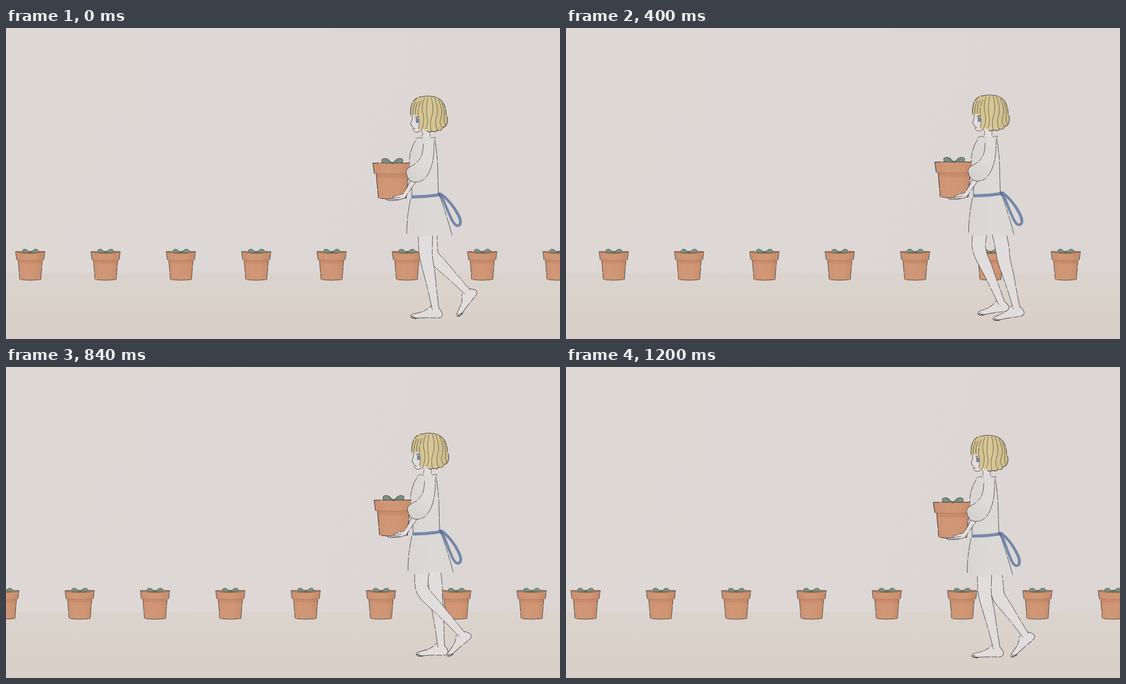
Recreate the animation shown at these times as an HTML page with a canvas. Size 998 by 561 pixels, loop 1.24 s.

```html
<!DOCTYPE html>
<html lang="en">
<head>
<meta charset="utf-8">
<title>Walk with a plant pot</title>
<style>
html, body { margin: 0; width: 100%; height: 100%; overflow: hidden; background: #ddd8d5; }
canvas { display: block; width: 100%; height: 100%; }
</style>
</head>
<body>
<canvas id="stage" width="998" height="561"></canvas>
<script>
const ctx = document.getElementById('stage').getContext('2d');
const STEP = 40, FRAMES = 31, CYCLE = 1280;
const INK = 'rgba(38,37,40,.8)', SKIN = '#e1dddc', CLOTH = '#dcd9d7', BLUE = '#7388ab';
const PENCIL = [24, 1.5, 11, 2.5, 33, 1];

// One leg over a full cycle: time, knee x/y, ankle x/y, toe x/y
const GAIT = [
  [0, 756, 409, 774, 508, 730, 520],
  [40, 758, 409, 774, 508, 730, 521],
  [160, 774, 411, 786, 508, 739, 521],
  [200, 777, 411, 789, 508, 745, 521],
  [320, 783, 412, 803, 508, 760, 522],
  [400, 787, 412, 812, 506, 770, 525],
  [560, 779, 411, 833, 487, 811, 520],
  [640, 768, 409, 837, 480, 820, 519],
  [680, 762, 408, 837, 478, 824, 518],
  [800, 751, 404, 828, 475, 813, 515],
  [840, 748, 403, 822, 483, 799, 516],
  [960, 746, 402, 796, 495, 753, 519],
  [1040, 746, 401, 790, 500, 748, 518],
  [1200, 754, 409, 776, 508, 734, 520]
];

function key(i) {
  const n = GAIT.length, lap = Math.floor(i / n);
  const [t, ...pose] = GAIT[i - lap * n];
  return { t: t + lap * CYCLE, pose };
}

// Cyclic Hermite interpolation through the keys
function poseAt(time) {
  const t = time % CYCLE;
  let i = 0;
  while (key(i + 1).t <= t) i++;
  const [a, b, c, d] = [-1, 0, 1, 2].map(o => key(i + o));
  const h = c.t - b.t, s = (t - b.t) / h;
  return b.pose.map((p, j) => {
    const q = c.pose[j];
    const m = (q - a.pose[j]) / (c.t - a.t) * h;
    const n = (d.pose[j] - p) / (d.t - b.t) * h;
    return p + s * m + s * s * (3 * (q - p) - 2 * m - n) + s * s * s * (2 * (p - q) + m + n);
  });
}

function paint(d, fill, stroke, width = .95) {
  const path = new Path2D(d);
  if (fill) { ctx.fillStyle = fill; ctx.fill(path); }
  if (stroke) {
    ctx.setLineDash(stroke === INK ? PENCIL : []);
    ctx.strokeStyle = stroke;
    ctx.lineWidth = width;
    ctx.stroke(path);
  }
}

function gradient(x0, y0, x1, y1, ...colors) {
  const g = ctx.createLinearGradient(x0, y0, x1, y1);
  colors.forEach((c, i) => g.addColorStop(i / (colors.length - 1), c));
  return g;
}

function at(x, y, draw) {
  ctx.save();
  ctx.translate(x, y);
  draw();
  ctx.restore();
}

function backdrop() {
  ctx.fillStyle = gradient(0, 0, 998, 442, '#ded9d5', '#ddd8d5', '#dbd6d3');
  ctx.fillRect(0, 0, 998, 442);
  ctx.fillStyle = gradient(0, 441, 0, 561, '#dbd4ce', '#d9d1ca', '#d8cfc8');
  ctx.fillRect(0, 441.5, 998, 120);
}

function pot(x, y, sx, sy, open) {
  at(x, y, () => {
    ctx.scale(sx, sy);
    const clay = gradient(-25, 0, 25, 0, '#c99170', '#d09878', '#cf9674', '#c38b6b');
    paint('M-22 14L-19 50.5Q0 53 19 50.5L22 14Z', clay, INK);
    paint('M-21.5 15H21.5L21 20Q0 24 -21 20Z', 'rgba(150,85,55,.15)');
    paint('M-26.5 0Q0 -1 26.5 0L24.5 15Q0 17 -24.5 15Z', clay);
    paint('M-24.5 15L-26.5 0Q0 -1 26.5 0L24.5 15', null, INK);
    paint('M-24.5 15Q0 17 24.5 15', null, 'rgba(110,65,45,.35)', .7);
    if (open) paint('M-25 .5H25Q20 3.5 0 3.8Q-20 3.5 -25 .5Z', '#b58468', 'rgba(70,45,35,.5)', .6);
    ctx.translate(0, open ? 2.4 : 0);
    paint('M0 1C-3 -1 -4 -6 -9 -6.8C-16 -7 -15.5 -1.5 -11 -.4Q-5 .8 0 -1Q5 .8 11 -.4C15.5 -1.5 16 -7 9 -6.8C4 -6 3 -1 0 1Z',
      '#7f9584', '#424e46', .8);
    paint('M0 -1L-10 -4M0 -1L10 -4M0 -1V2', null, '#5c7163', .6);
  });
}

function leg(time, dx, dy) {
  let [kx, ky, ax, ay, tx, ty] = poseAt(time);
  kx += dx * .5; ax += dx; tx += dx; ay += dy; ty += dy;
  const hx = 755 + .75 * (kx - 755);
  const shin = Math.hypot(ax - kx, ay - ky);
  const nx = (ay - ky) / shin, ny = -(ax - kx) / shin;
  const side = (part, w) => [kx + (ax - kx) * part + nx * w, ky + (ay - ky) * part + ny * w];

  const len = Math.hypot(tx - ax, ty - ay);
  const ux = (tx - ax) / len, uy = (ty - ay) / len;
  ctx.save();
  ctx.transform(ux, uy, uy, -ux, ax, ay);
  paint('M-7 0C-9 6 -11 10 -8 14Q-5 17 2 15Q20 9 36 6Q47 4 47 0Q46 -3 41 -3Q28 -2 21 -3Q12 -5 6 -9', SKIN, INK);
  paint('M47 1L41 1M45 4L39 4M41 6L36 6', null, INK, 1.4);
  ctx.restore();

  const front = [[hx - 13, 365], [kx - 13, ky - 16], side(.02, -12), side(.28, -10), side(.65, -7), side(1, -6)];
  const back = [[hx + 13, 365], [kx + 12, ky - 16], side(.05, 11), side(.32, 11), side(.65, 8), side(1, 6)];
  const curve = pts => {
    let d = '';
    for (let i = 1; i < pts.length - 2; i++)
      d += `Q${pts[i]} ${(pts[i][0] + pts[i + 1][0]) / 2},${(pts[i][1] + pts[i + 1][1]) / 2}`;
    return d + `Q${pts.at(-2)} ${pts.at(-1)}`;
  };
  const down = curve(front), up = curve([...back].reverse());
  paint(`M${front[0]}${down}L${back.at(-1)}${up}Z`, SKIN);
  paint(`M${front[0]}${down}M${back.at(-1)}${up}`, null, INK);
}

function dress() {
  paint('M742 197Q730 212 727 235Q728 262 731 282L730 306Q723 335 722 372Q726 378 740 377Q765 373 782 375Q796 378 804 376Q798 340 781 302Q779 250 774 204L768 196Z',
    gradient(722, 0, 800, 0, '#d8d5d3', CLOTH, '#dbd8d6'));
  paint('M738 203Q729 216 727 236V244M731 280L731 302M729 308Q722 340 722 371M773 203Q778 235 778 262L779 298M782 304Q794 338 804 375', null, INK);
}

function ribbon(time) {
  at(782, 299, () => {
    ctx.rotate(.05 * time / 1240);
    paint('M1 0C8 16 16 37 23 50Q30 61 35 56Q39 50 32 37Q20 14 1 0Z', null, BLUE, 4.6);
    paint('M3 -1Q21 13 34 35Q42 50 37 58', null, '#5a6a87', .6);
  });
  paint('M730 304.5Q755 305 782 300.5', null, BLUE, 4.6);
  paint('M730 302Q755 302.5 782 298M730 307Q755 307.5 781 303', null, '#5d6d8a', .5);
  paint('M779 297L783 305', null, '#566b91', 3.5);
}

function arm() {
  paint('M729 274Q723 289 715 299Q706 302 697 304L698 307Q690 308 685 309Q686 312 696 311Q710 311 719 306Q724 298 739 277Z', SKIN, INK);
  paint('M697 307L711 305M690 310L708 309', null, INK, .8);
  paint('M764 198Q752 205 750 225Q747 239 732 248Q720 254 721 261Q723 271 729 276Q738 281 750 275Q763 267 769 240Q774 220 772 205Q770 198 764 198Z',
    gradient(725, 270, 775, 205, '#d3d0ce', '#dedbd9', '#dfdcda'));
  paint('M752 209Q751 226 748 232Q742 243 730 249Q720 254 721 261Q723 271 729 276Q738 281 750 275Q763 267 769 240Q772 222 771 207', null, INK);
}

function head() {
  paint('M750 182V198L766 199L765 182Z', SKIN);
  paint('M751 187L750 196M764 187V196', null, INK, .8);
  paint('M739 200Q744 195 752 198Q762 200 774 196L773 205Q760 200 748 205Z', CLOTH);
  paint('M738 201Q743 195 751 199M765 198L774 197L771 206', null, INK, .8);
  paint('M732 150L732 164Q730 170 729 174L732 176L732 179L734 181L733 184Q735 188 741 188L752 186V150Z', SKIN);
  paint('M732 157L732 164Q730 170 729 174L732 176L732 179L735 180M733 182Q735 188 741 188L746 186', null, INK);
  paint('M733 181L738 182', null, INK, .8);
  paint('M739 162Q744 163 743 170Q740 173 739 169Z', '#7889a6', '#4a5468', .7);
  paint('M737 161L744 160', null, INK, 1.1);

  paint('M729 158C728 143 731 125 749 124Q762 121 775 125C788 130 793 143 793 155Q797 165 795 171Q793 179 787 179Q784 187 778 184Q774 189 768 186Q763 189 758 186L755 178L755 187L750 180L748 187Q744 185 743 182Q746 171 743 158L740 160L738 156L735 160L733 156Z',
    gradient(728, 0, 796, 0, '#cfbd8c', '#d8c897', '#cbb988'));
  paint('M729 158C728 143 731 125 749 124Q762 121 775 125C788 130 793 143 793 155Q797 165 795 171Q793 179 787 179Q784 187 778 184Q774 189 768 186Q763 189 758 186', null, INK, 1.1);
  paint('M743 182Q746 171 743 158Q741 145 748 131M750 180L748 187M733 156Q732 145 738 133M738 156Q736 144 743 132', null, INK, .8);
  paint('M754 126Q747 142 752 157Q754 170 750 180M760 125Q757 143 758 156Q762 170 756 183M766 125Q772 145 767 160Q763 171 766 186M772 126Q781 147 775 163Q772 174 777 184M779 129Q789 148 783 164Q780 173 786 179M786 136Q792 152 789 166L792 176',
    null, '#665b45', .9);
}

function render(frame) {
  const time = frame * STEP;
  const wave = shift => Math.cos(2 * Math.PI * (time - shift) / (CYCLE / 2));
  backdrop();
  for (let i = -1; i < 8; i++) pot(43.7 + i * 135.7 + frame * 4.24, 403.3, 1, 1, true);
  leg(time + CYCLE / 2, -5, -3);
  leg(time, 0, 0);
  at(1.75 - 1.9 * wave(20), -1.6 + 2.1 * wave(575), () => {
    pot(696, 243.7, 1.32, 1.25, false);
    dress();
    ribbon(time);
    arm();
    head();
  });
}

ctx.lineJoin = 'round';
const start = performance.now();
(function tick() {
  render(Math.floor((performance.now() - start) / STEP) % FRAMES);
  requestAnimationFrame(tick);
})();
</script>
</body>
</html>
```
